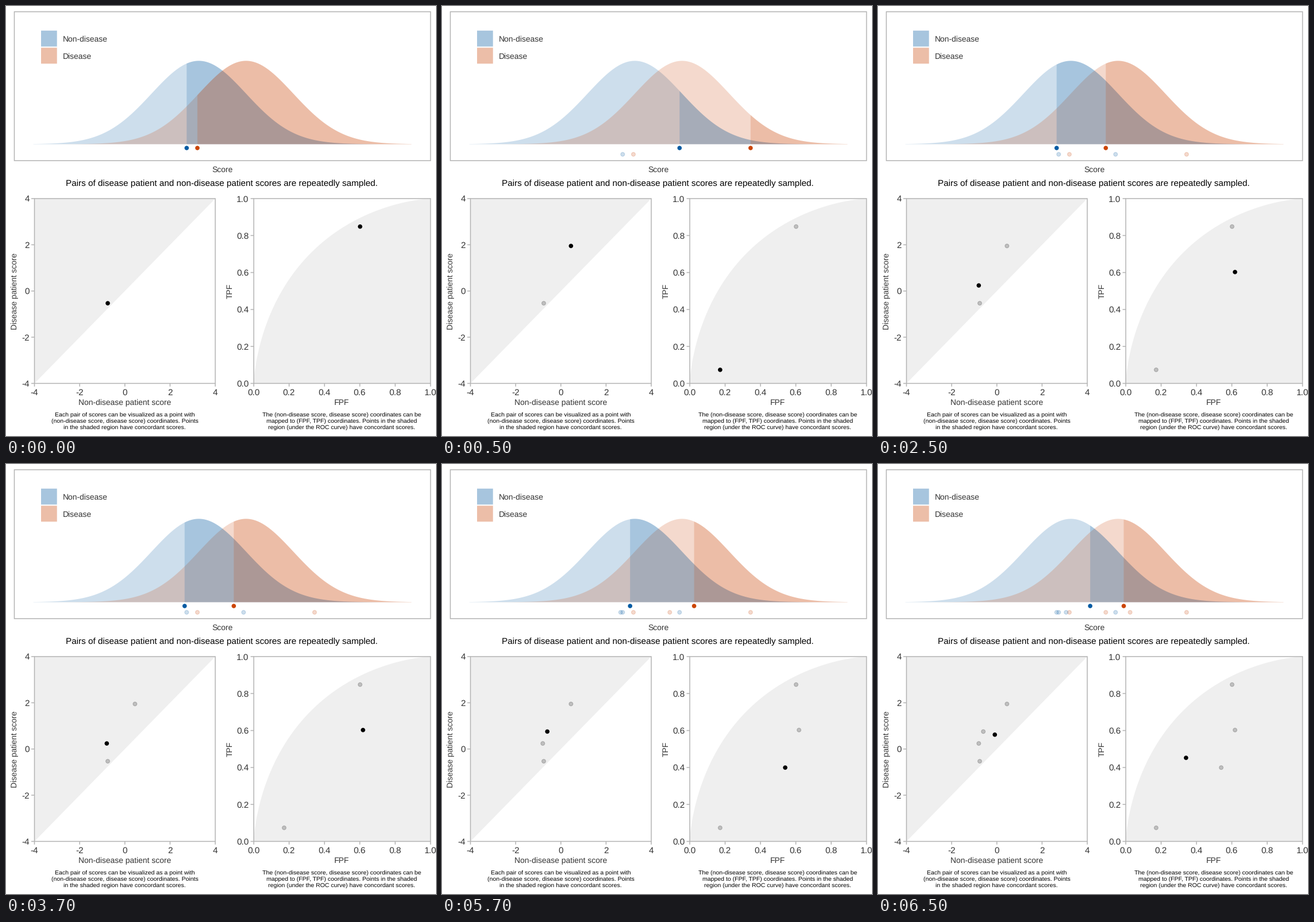
Animation, 748 px wide and 748 px high, one loop 8000 ms. Source, as a matplotlib script:

```python
import math

import matplotlib.pyplot as plt
import numpy as np
from matplotlib.animation import FuncAnimation
from matplotlib.patches import Circle, Polygon, Rectangle

SIZE, DPI = 748, 100
PX = 72 / DPI
BLUE, ORANGE = "#055ba3", "#cb4506"
GREY, SHADE, INK = "#b3b3b3", "#efefef", "#333333"
FAINT, STRONG = 0.2, 0.35
FRAME_MS, PAIR_MS, LEAD_MS, LOOP_MS = 500, 2000, 1500, 8000

# Sampled (non-disease, disease) scores
PAIRS = [(-0.757, -0.53), (0.447, 1.95), (-0.80, 0.24), (-0.60, 0.755), (-0.09, 0.62)]
MEANS = (-0.5, 0.5)

plt.rcParams.update({"font.family": "Liberation Sans", "text.hinting": "none"})
fig = plt.figure(figsize=(SIZE / DPI, SIZE / DPI), dpi=DPI, facecolor="white")
ax = fig.add_axes([0, 0, 1, 1])
ax.set(xlim=(0, SIZE), ylim=(SIZE, 0))
ax.axis("off")

LEFT, RIGHT = (49.5, 364.0), (431.0, 738.5)
TOP, BOTTOM = 335.0, 656.5
BASE, PEAK = 240.4, 145.0


def tail_prob(z):
    return 0.5 * math.erfc(z / math.sqrt(2))


def score_x(score):
    return 376.5 + 82.2 * score


def score_point(x, y):
    return (LEFT[0] + (x + 4) / 8 * (LEFT[1] - LEFT[0]),
            BOTTOM - (y + 4) / 8 * (BOTTOM - TOP))


def roc_point(fpf, tpf):
    return RIGHT[0] + fpf * (RIGHT[1] - RIGHT[0]), BOTTOM - tpf * (BOTTOM - TOP)


def rates(pair):
    return [tail_prob(score - mean) for score, mean in zip(pair, MEANS)]


def text(x, y, label, size, color=INK, ha="center", rotation=0):
    ax.text(x, y, label, fontsize=size * PX, color=color, ha=ha, va="baseline",
            rotation=rotation, rotation_mode="anchor", zorder=6)


def box(x0, y0, x1, y1):
    ax.add_patch(Rectangle((x0, y0), x1 - x0, y1 - y0, fill=False,
                           ec=GREY, lw=1.5 * PX, snap=False, zorder=4))


def shade(points, color, alpha=1, zorder=1):
    return ax.add_patch(Polygon(points, fc=color, alpha=alpha, lw=0,
                                snap=False, zorder=zorder))


def bell(mean, start, color, alpha, zorder):
    s = np.linspace(start, 4, 400)
    y = BASE - PEAK * np.exp(-(s - mean) ** 2 / 2)
    outline = [(score_x(start), BASE), *zip(score_x(s), y), (score_x(4), BASE)]
    return shade(outline, color, alpha, zorder)


def dot(center, color, current):
    if current:
        style = dict(radius=3.8, fc=color, lw=0, zorder=8)
    else:
        style = dict(radius=3.4, fc=(color, FAINT), ec=(color, FAINT),
                     lw=1.1 * PX, zorder=7)
    return ax.add_patch(Circle(center, **style))


def tick(x, y, dx, dy):
    ax.plot([x, x + dx], [y, y + dy], color=GREY, lw=1.5 * PX,
            solid_capstyle="butt", snap=False, zorder=4)


def axes_ticks(values, place, fmt):
    for v in values:
        x, y = place(v, values[0])
        tick(x, y, 0, 5.5)
        text(x, 676.7, fmt.format(v), 15.3)
        x, y = place(values[0], v)
        tick(x, y, -5.5, 0)
        text(x - 8.8, y + 5.4, fmt.format(v), 15.3, ha="right")


def caption(x, lines):
    for i, line in enumerate(lines):
        text(x, 713.7 + 11.3 * i, line, 10.44, "black")


def draw_static():
    box(14.5, 10, 738.5, 269)
    for y, label, color in ((42.8, "Non-disease", BLUE), (72.6, "Disease", ORANGE)):
        ax.add_patch(Rectangle((61, y), 27.7, 27.7, fc=color, alpha=STRONG, lw=0,
                               snap=False))
        text(99, y + 19, label, 13.9, ha="left")
    for mean, color, z in zip(MEANS, (BLUE, ORANGE), (1, 1.1)):
        bell(mean, -4, color, FAINT, z)
    text(376.2, 288.8, "Score", 13.86)
    text(375.8, 312.8, "Pairs of disease patient and non-disease patient scores "
         "are repeatedly sampled.", 15.22, "black")

    shade([score_point(-4, -4), score_point(-4, 4), score_point(4, 4)], SHADE)
    curve = [roc_point(*rates((t, t))) for t in np.linspace(4.5, -4.5, 300)]
    shade([roc_point(0, 0), *curve, roc_point(1, 1), roc_point(1, 0)], SHADE)
    for x0, x1 in (LEFT, RIGHT):
        box(x0, TOP, x1, BOTTOM)
    axes_ticks(range(-4, 5, 2), score_point, "{}")
    axes_ticks([i / 5 for i in range(6)], roc_point, "{:.1f}")

    text(206.5, 694.2, "Non-disease patient score", 13.86)
    text(584.3, 694.2, "FPF", 13.86)
    text(19, 496, "Disease patient score", 13.86, rotation=90)
    text(393.5, 496, "TPF", 13.86, rotation=90)
    caption(206.5, ["Each pair of scores can be visualized as a point with",
                    "(non-disease score, disease score) coordinates. Points",
                    "in the shaded region have concordant scores."])
    caption(584.3, ["The (non-disease score, disease score) coordinates can be",
                    "mapped to (FPF, TPF) coordinates. Points in the shaded",
                    "region (under the ROC curve) have concordant scores."])


shown = []


def clear():
    while shown:
        shown.pop().remove()
    return []


def update(frame):
    clear()
    latest = (frame * FRAME_MS + LEAD_MS) // PAIR_MS
    # A second layer lifts the tail from FAINT to STRONG
    lift = 1 - (1 - STRONG) / (1 - FAINT)
    for score, mean, color, z in zip(PAIRS[latest], MEANS, (BLUE, ORANGE), (2, 2.1)):
        shown.append(bell(mean, score, color, lift, z))
    for i, pair in enumerate(PAIRS[:latest + 1]):
        current = i == latest
        for score, color in zip(pair, (BLUE, ORANGE)):
            shown.append(dot((score_x(score), 247 if current else 258), color, current))
        for center in (score_point(*pair), roc_point(*rates(pair))):
            shown.append(dot(center, "black", current))
    return shown


draw_static()
anim = FuncAnimation(fig, update, frames=LOOP_MS // FRAME_MS, init_func=clear,
                     interval=FRAME_MS, repeat=True, repeat_delay=0, blit=False)
plt.show()
```
